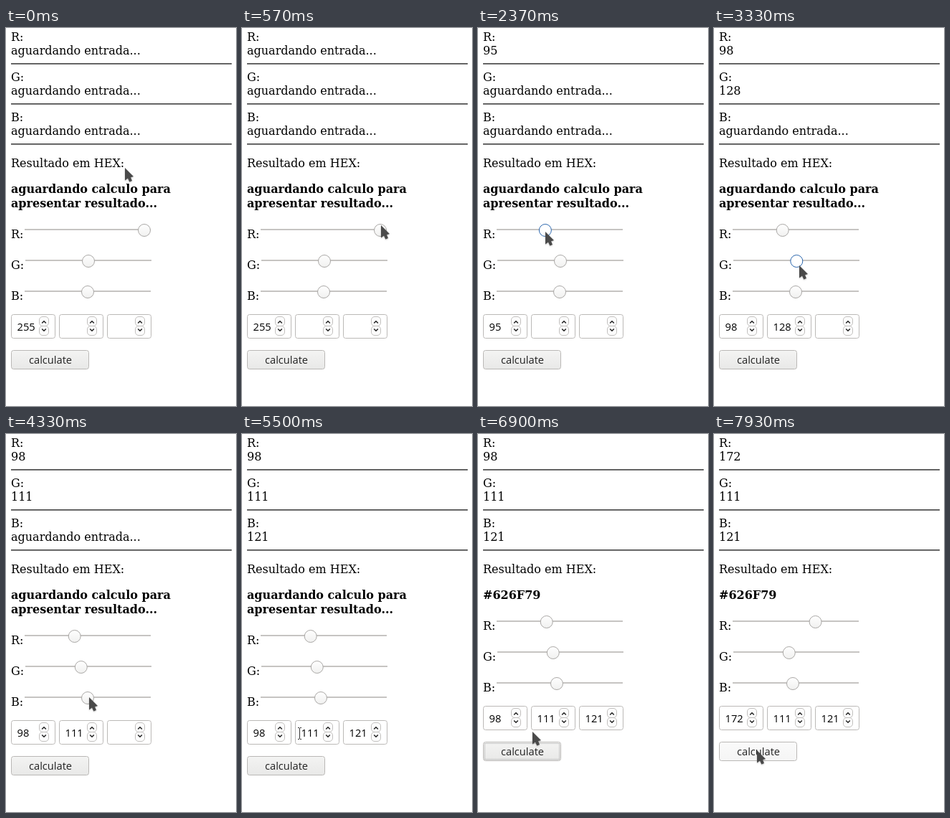
An HTML page with a canvas for the animation above (8000 ms loop, 321 by 527 pixels).

```html
<!DOCTYPE html>
<html lang="pt">
<head>
<meta charset="utf-8">
<title>RGB para HEX</title>
<style>
html, body { margin: 0; width: 100%; height: 100%; overflow: hidden; background: #fff; }
canvas { display: block; }
</style>
</head>
<body>
<canvas id="stage" width="321" height="527"></canvas>
<script>
const ctx = document.getElementById('stage').getContext('2d');
const LOOP = 8000, STEP = 100 / 3, SHIFT = 20;
const SERIF = '16px "DejaVu Serif", serif';
const SANS = '14.67px "Open Sans", sans-serif';
const WAIT = 'aguardando entrada...';
const PRESS_AT = 5990, RESULT_AT = 6160;

// Pointer moves: start, end, x, y; it rests in between
const moves = [
  [0, 770, 200, 292], [1390, 1390, 115, 277], [1400, 2170, 94, 284],
  [2500, 3030, 120, 331], [3230, 4000, 102, 335], [4100, 4330, 116, 367],
  [4900, 5170, 110, 370], [5200, 5490, 80, 417], [5500, 5770, 60, 455],
  [6890, 6890, 76, 415], [6900, 7230, 96, 264], [7230, 7700, 142, 264],
  [7700, 7930, 60, 441]
];

// Slider drags, pressed from "down" until "up"
const drags = [
  { ch: 'R', down: 760, start: 1390, end: 2170, up: 2370, from: 153, to: 95 },
  { ch: 'R', down: 2370, start: 2380, end: 2500, up: 2560, from: 95, to: 98 },
  { ch: 'G', down: 2980, start: 3020, end: 3930, up: 3980, from: 134, to: 111 },
  { ch: 'B', down: 4520, start: 4690, end: 5170, up: 5200, from: 127, to: 121 },
  { ch: 'R', down: 7200, start: 7230, end: 7670, up: 7750, from: 98, to: 172 }
];

function ease(t, start, end) {
  const k = t >= end ? 1 : (t - start) / (end - start);
  return k * k * (3 - 2 * k);
}

function pointerAt(t) {
  let x = 166, y = 195;
  for (const [start, end, toX, toY] of moves) {
    if (t < start) break;
    const k = ease(t, start, end);
    x += (toX - x) * k;
    y += (toY - y) * k;
  }
  return [Math.round(x), Math.round(y)];
}

function channelAt(ch, t) {
  const own = drags.filter(d => d.ch === ch);
  const d = own.filter(d => t >= d.start).pop();
  return {
    shown: !!d,
    value: d ? Math.round(d.from + (d.to - d.from) * ease(t, d.start, d.end)) : ch === 'R' ? 255 : 127.5,
    active: own.some(d => t >= d.down && t < d.up)
  };
}

function text(str, x, y, font = SERIF, color = '#000') {
  ctx.font = font;
  ctx.fillStyle = color;
  ctx.fillText(str, x, y);
}

function box(x, y, w, h, r, fill, stroke) {
  ctx.beginPath();
  ctx.roundRect(x + .5, y + .5, w - 1, h - 1, r);
  ctx.fillStyle = fill;
  ctx.fill();
  ctx.strokeStyle = stroke;
  ctx.lineWidth = 1;
  ctx.stroke();
}

function shade(y, h, top, bottom) {
  const g = ctx.createLinearGradient(0, y, 0, y + h);
  g.addColorStop(0, top);
  g.addColorStop(1, bottom);
  return g;
}

function poly(points, close) {
  ctx.beginPath();
  points.forEach(p => ctx.lineTo(p[0], p[1]));
  if (close) ctx.closePath();
}

function slider(name, x, y, value, active) {
  text(name + ':', 7, y + 12);
  ctx.fillStyle = '#c6c4c2';
  ctx.fillRect(x, y - 1, 176, 2);
  ctx.beginPath();
  ctx.arc(x + 9 + value / 255 * 158, y + 1, 8.5, 0, 7);
  ctx.fillStyle = shade(y - 8, 18, '#fff', active ? '#fff' : '#f0f0ef');
  ctx.fill();
  ctx.strokeStyle = active ? '#2a66ad' : '#aaa8a6';
  ctx.lineWidth = 1;
  ctx.stroke();
}

function field(x, y, value) {
  box(x, y, 62, 34, 3, '#fff', '#bbb9b7');
  text(value, x + 8.5, y + 23, '500 ' + SANS);
  for (const dir of [-1, 1]) {
    box(x + 39, y + (dir < 0 ? 3 : 16), 14, 14, 4.5, '#fcfcfc', '#c2c0be');
    const cx = x + 46, cy = y + (dir < 0 ? 11 : 22);
    poly([[cx - 2.8, cy - dir * 1.5], [cx, cy + dir * 1.3], [cx + 2.8, cy - dir * 1.5]]);
    ctx.strokeStyle = '#222';
    ctx.lineWidth = 1.5;
    ctx.stroke();
  }
}

function button(y, hover, pressed, focus) {
  const [top, bottom] = pressed ? ['#d8d8d8', '#e2e2e2']
    : hover ? ['#fafafa', '#f5f5f5'] : ['#f4f4f3', '#e8e8e7'];
  box(7, y, 109, 27, 3, shade(y, 27, top, bottom), '#bab8b6');
  if (focus) {
    ctx.setLineDash([1, 1]);
    ctx.strokeStyle = '#a0a0a0';
    ctx.strokeRect(9.5, y + 2.5, 104, 22);
    ctx.setLineDash([]);
  }
  text('calculate', 32, y + 19, SANS, '#222');
}

function arrow(x, y) {
  ctx.save();
  ctx.translate(x, y);
  poly([[0, 0], [0, 17.5], [4, 14.5], [6.3, 19.5], [10, 18], [8, 13.3], [12, 12]], true);
  ctx.shadowColor = 'rgba(0,0,0,.25)';
  ctx.shadowBlur = 2;
  ctx.shadowOffsetY = 1;
  ctx.fillStyle = '#4a4a4a';
  ctx.fill();
  ctx.restore();
}

function beam(x, y) {
  ctx.fillStyle = '#333';
  ctx.fillRect(x, y - 7, 1, 15);
  for (const dy of [-8, 8]) {
    ctx.fillRect(x - 2, y + dy, 2, 1);
    ctx.fillRect(x + 1, y + dy, 2, 1);
  }
}

function draw(t) {
  const done = t >= RESULT_AT, up = done ? SHIFT : 0;
  const [px, py] = pointerAt(t);
  ctx.fillStyle = '#fff';
  ctx.fillRect(0, 0, 321, 527);

  ['R', 'G', 'B'].forEach((name, i) => {
    const { shown, value, active } = channelAt(name, t);
    const top = i * 56;
    text(name + ':', 7, top + 18);
    text(shown ? value : WAIT, 7, top + 37);
    ctx.fillStyle = '#484848';
    ctx.fillRect(7, top + 49, 308, 1);
    ctx.fillStyle = '#858585';
    ctx.fillRect(7, top + 50, 308, 1);
    slider(name, 26 + i % 2, 281 + i * 43 - up, value, active);
    field(7 + i * 67, 399 - up, shown || name === 'R' ? value : '');
  });

  text('Resultado em HEX:', 7, 194);
  const bold = 'bold ' + SERIF;
  if (done) text('#626F79', 7, 230, bold);
  else {
    text('aguardando calculo para', 7, 230, bold);
    text('apresentar resultado...', 7, 250, bold);
  }

  const by = 449 - up;
  const hover = px > 7 && px < 116 && py >= by && py < by + 26;
  button(by, hover, t >= PRESS_AT && !done, t >= PRESS_AT && t < 7200);

  const inField = py > by - 50 && py < by - 16 && px > 7 && px < 203 && (px - 7) % 67 < 38;
  (inField ? beam : arrow)(px, py);
}

function tick(now) {
  draw(Math.floor(now % LOOP / STEP + .2) * STEP);
  requestAnimationFrame(tick);
}
draw(0);
requestAnimationFrame(tick);
</script>
</body>
</html>
```
